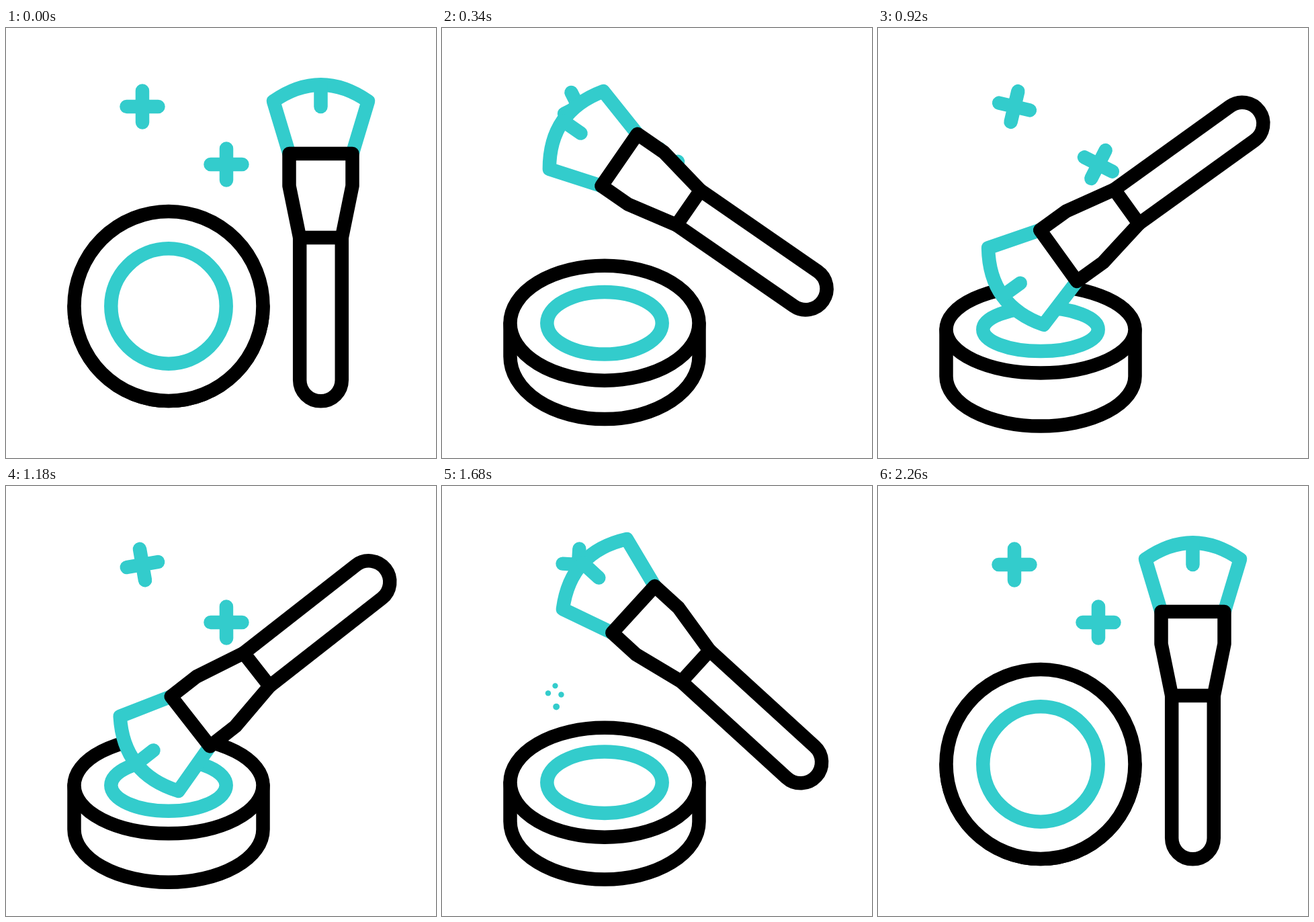
An HTML page with a canvas that plays this animation: 640 px wide and 640 px high, repeating every 2.4 s.

```html
<!DOCTYPE html>
<html lang="en">
<head>
<meta charset="utf-8">
<title>Powder and brush</title>
<style>
  html, body { margin: 0; width: 100%; height: 100%; overflow: hidden; background: #fff; }
  canvas { display: block; width: 640px; height: 640px; }
</style>
</head>
<body>
<canvas id="stage" width="640" height="640"></canvas>
<script>
const ctx = document.getElementById('stage').getContext('2d');
const LOOP = 2400, TEAL = '#33cccc', BLACK = '#000', WHITE = '#fff', LINE = 20.5;

const clamp = v => Math.min(1, Math.max(0, v));
const span = (t, from, to) => clamp((t - from) / (to - from));
const ease = x => (1 - Math.cos(Math.PI * x)) / 2;
const mix = (a, b, k) => a + (b - a) * k;
const rad = deg => deg * Math.PI / 180;

// Linear interpolation through [time, value] keys.
function follow(keys, t) {
  let value = keys[0][1];
  for (let i = 1; i < keys.length; i++) {
    value = mix(value, keys[i][1], span(t, keys[i - 1][0], keys[i][0]));
  }
  return value;
}

function paint(color, build, fill) {
  ctx.beginPath();
  build();
  if (fill) { ctx.fillStyle = WHITE; ctx.fill(); }
  ctx.strokeStyle = color;
  ctx.stroke();
}

function polyline(points) {
  points.forEach(([x, y]) => ctx.lineTo(x, y));
}

const STARS = [
  { x: 203, y: 117, turn: [[0, 0], [340, -26.6], [660, -53.6], [1180, -99.7], [1500, -149], [1860, -204], [2170, -270]] },
  { x: 328, y: 203, turn: [[200, 0], [340, -10], [660, -36], [1180, -90], [1500, -150], [1860, -183.5], [2260, -270]] }
];

function drawStar({ x, y, turn }, t) {
  ctx.save();
  ctx.translate(x, y);
  ctx.rotate(rad(follow(turn, t)));
  paint(TEAL, () => {
    ctx.moveTo(-23.5, 0); ctx.lineTo(23.5, 0);
    ctx.moveTo(0, -23.5); ctx.lineTo(0, 23.5);
  });
  ctx.restore();
}

// Powder specks drift away from one spot, slowing down, then shrink.
const PUFF = { x: 185, y: 340 };
const SPECKS = [
  { dx: -172, dy: -201, from: 1640, to: 2140 },
  { dx: -107, dy: -276, from: 1640, to: 2150 },
  { dx: -48, dy: -188, from: 1640, to: 2140 },
  { dx: -82, dy: -63, from: 1620, to: 2260 }
];

function drawSpeck({ dx, dy, from, to }, t) {
  const life = span(t, from, to);
  if (life <= 0 || life >= 1) return;
  const way = 1 - (1 - life) ** 2;
  const radius = 10.3 * Math.min(1, life / 0.2, (1 - life) / 0.3);
  ctx.fillStyle = TEAL;
  ctx.beginPath();
  ctx.arc(PUFF.x + dx * way, PUFF.y + dy * way, radius, 0, 2 * Math.PI);
  ctx.fill();
}

// Compact: top centre, outer radius, inner radius, side end, lowest point.
const FLAT = [414, 141, 85.7, 414, 555];
const TILTED = [451, 59.5, 28, 524, 594.7];
const LIFTED = [442.8, 78, 43.4, 504.5, 587.3];

function drawCompact(t) {
  const poses = [FLAT, TILTED, LIFTED, FLAT], times = [10, 545, 1600, 2140];
  let pose = FLAT;
  for (let i = 1; i < poses.length; i++) {
    const k = ease(span(t, times[i - 1], times[i]));
    pose = pose.map((v, j) => mix(v, poses[i][j], k));
  }
  const [cy, outer, inner, side, bottom] = pose, cx = 242, rx = 140.5;
  paint(BLACK, () => {
    ctx.moveTo(cx + rx, cy);
    ctx.lineTo(cx + rx, side);
    ctx.ellipse(cx, side, rx, bottom - side, 0, 0, Math.PI);
    ctx.lineTo(cx - rx, cy);
  }, true);
  paint(BLACK, () => ctx.ellipse(cx, cy, rx, outer, 0, 0, 2 * Math.PI), true);
  paint(TEAL, () => ctx.ellipse(cx, cy, 85.7, inner, 0, 0, 2 * Math.PI));
}

function drawBrush(t) {
  const swing = ease(span(t, 50, 699)) - ease(span(t, 1350, 1911));
  const dab = Math.sin(Math.PI * span(t, 700, 1340)) ** 2;
  ctx.save();
  ctx.translate(468.5 + 3 * swing, 437 - 234.8 * swing - 12 * dab);
  ctx.rotate(rad(-132 * swing + 8 * dab));
  // bristles
  paint(TEAL, () => {
    ctx.moveTo(-47, -250);
    ctx.lineTo(-70.5, -328);
    ctx.quadraticCurveTo(0, -377, 70.5, -328);
    ctx.lineTo(47, -250);
  }, true);
  paint(TEAL, () => polyline([[0, -352], [0, -320]]));
  // handle
  paint(BLACK, () => {
    ctx.moveTo(31.3, -125);
    ctx.lineTo(31.3, 87);
    ctx.arc(0, 87, 31.3, 0, Math.PI);
    ctx.lineTo(-31.3, -125);
  }, true);
  // ferrule
  paint(BLACK, () => {
    polyline([[-47, -250], [47, -250], [47, -202], [31.3, -125], [-31.3, -125], [-47, -202]]);
    ctx.closePath();
  }, true);
  ctx.restore();
}

function draw(now) {
  const t = now % LOOP;
  ctx.fillStyle = WHITE;
  ctx.fillRect(0, 0, 640, 640);
  ctx.lineWidth = LINE;
  ctx.lineCap = ctx.lineJoin = 'round';
  STARS.forEach(star => drawStar(star, t));
  SPECKS.forEach(speck => drawSpeck(speck, t));
  drawCompact(t);
  drawBrush(t);
}

const start = performance.now();
function tick() {
  draw(performance.now() - start);
  requestAnimationFrame(tick);
}
tick();
</script>
</body>
</html>
```
